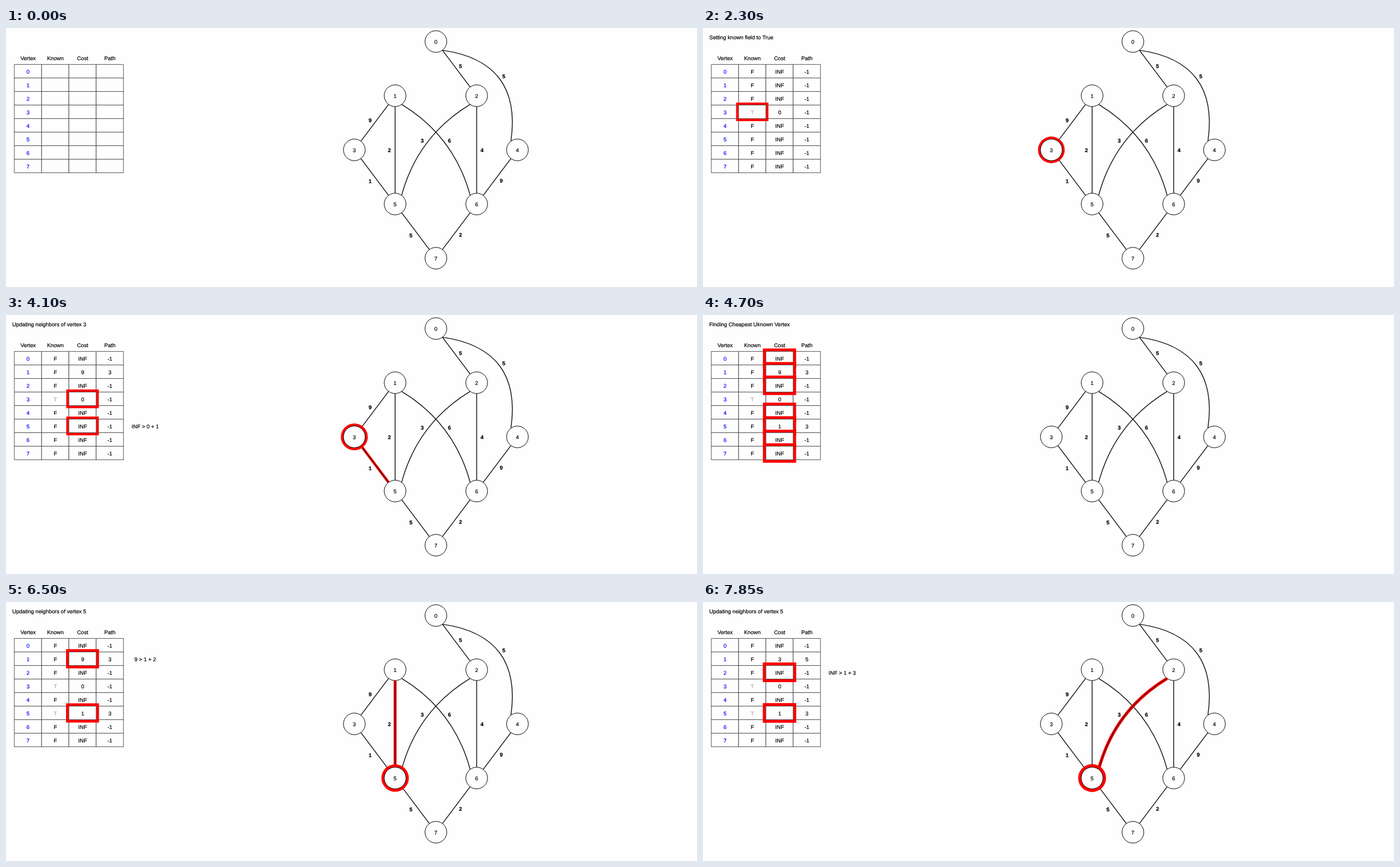
These frames come from a looping animation (1220 by 459 pixels, 8000 ms). An HTML page:

```html
<!DOCTYPE html>
<html lang="en">
<head>
<meta charset="utf-8">
<title>Shortest path table</title>
<style>
  html, body { margin: 0; width: 100%; height: 100%; overflow: hidden; background: #fefefe; }
  svg { display: block; font: 9.6px "Liberation Sans", Arial, sans-serif; text-rendering: geometricPrecision; }
</style>
</head>
<body>
<svg id="stage" width="1220" height="459" viewBox="0 0 1220 459"></svg>
<script>
const LOOP = 8000, START = 500, TICK = 150, STEP = 750;
const SCALE = 0.96, RADIUS = 20 * SCALE, CELL_W = 48.15, CELL_H = 24;
const RED = '#f00';

const nodes = [[759, 24], [687, 120], [831, 120], [615, 216], [903, 216], [687, 312], [831, 312], [759, 408]];

// from, to, weight, label x, label y, curvature
const edges = [
  [0, 2, 5, 802.5, 67, 0], [0, 4, 5, 879, 85, 0.5],
  [1, 3, 9, 643, 163, 0], [1, 5, 2, 677, 216.5, 0], [1, 6, 6, 783, 199, 0.2],
  [2, 5, 3, 735, 199, -0.2], [2, 6, 4, 840.5, 216.5, 0],
  [3, 5, 1, 643, 271, 0], [4, 6, 9, 874.5, 270.5, 0],
  [5, 7, 5, 715, 367.5, 0], [6, 7, 2, 802.5, 366.5, 0]
];

const KNOWN = 1, COST = 2;
const colX = col => 38.8 + col * CELL_W;
const rowY = row => 76.6 + row * CELL_H;

function text(x, y, str, color = '#000', extra = 'text-anchor="middle"') {
  const safe = String(str).replace('>', '&gt;');
  return `<text x="${x}" y="${y + 3.5}" fill="${color}" stroke="${color}" stroke-width="0.2" ${extra}>${safe}</text>`;
}

function edgePath([a, b, , , , bend]) {
  const [ax, ay] = nodes[a], [bx, by] = nodes[b];
  const len = Math.hypot(bx - ax, by - ay);
  const ux = (bx - ax) / len * RADIUS, uy = (by - ay) / len * RADIUS;
  const x1 = ax + ux, y1 = ay + uy, x2 = bx - ux, y2 = by - uy;
  const cx = (x1 + x2) / 2 + (y2 - y1) * bend;
  const cy = (y1 + y2) / 2 - (x2 - x1) * bend;
  return `M${x1} ${y1}Q${cx} ${cy} ${x2} ${y2}`;
}

function drawEdge(edge, glow) {
  const path = (color, width) =>
    `<path d="${edgePath(edge)}" fill="none" stroke="${color}" stroke-width="${width}"/>`;
  const line = glow ? path(RED, (glow + 0.5) * SCALE) + path('#600', 1.7) : path('#111', 1.45);
  return line + text(edge[3], edge[4], edge[2], '#000', 'text-anchor="middle" font-weight="bold"');
}

function drawNode(i, glow) {
  const [x, y] = nodes[i];
  const halo = glow ? `<circle cx="${x}" cy="${y}" r="${RADIUS + (glow + 0.5) * SCALE}" fill="${RED}"/>` : '';
  return halo + `<circle cx="${x}" cy="${y}" r="${RADIUS}" fill="#fefefe" stroke="#000"/>` + text(x, y + 0.3, i);
}

function drawCell(col, row, str, glow) {
  const x = colX(col), y = rowY(row);
  const box = (grow, paint) =>
    `<rect x="${x - CELL_W / 2 - grow}" y="${y - CELL_H / 2 - grow}" width="${CELL_W + 2 * grow}" height="${CELL_H + 2 * grow}" ${paint}/>`;
  const color = col === 0 ? '#00f' : str === 'T' ? '#aaa' : '#000';
  return (glow ? box((glow + 0.5) * SCALE, `fill="${RED}"`) : '') +
    box(0, 'fill="#fefefe" stroke="#444" stroke-width="0.9"') + text(x + 0.2, y + 0.4, str, color);
}

// Run the algorithm once and record what each step shows.
function buildSteps() {
  const known = Array(8).fill(false), cost = Array(8).fill(Infinity), prev = Array(8).fill(-1);
  const name = value => value === Infinity ? 'INF' : value;
  const steps = [];
  const record = (message, cells, node = -1, edge = null, compare = null) => steps.push({
    message, cells, node, edge, compare,
    table: known.map((k, i) => [i, k ? 'T' : 'F', name(cost[i]), prev[i]])
  });
  cost[3] = 0;
  while (steps.length < 10) {
    const open = known.map((k, i) => i).filter(i => !known[i]);
    record('Finding Cheapest Uknown Vertex', open.map(i => [COST, i]));
    const v = open.reduce((best, i) => cost[i] < cost[best] ? i : best);
    record('Cheapest Unknown Vertex: ' + v, [[COST, v]], v);
    known[v] = true;
    record('Setting known field to True', [[KNOWN, v]], v);
    for (let n = 0; n < 8; n++) {
      const edge = edges.find(([a, b]) => (a === v && b === n) || (a === n && b === v));
      if (!edge || known[n]) continue;
      const total = cost[v] + edge[2];
      const rule = `${name(cost[n])} > ${cost[v]} + ${edge[2]}`;
      record('Updating neighbors of vertex ' + v, [[COST, v], [COST, n]], v, edge,
        { row: n, str: cost[n] > total ? rule : `!(${rule})` });
      if (cost[n] > total) { cost[n] = total; prev[n] = v; }
    }
  }
  return steps;
}

const steps = buildSteps();
const blank = { message: '', cells: [], node: -1, edge: null, compare: null,
  table: nodes.map((_, i) => [i, '', '', '']) };

// Highlight thickness: a triangle wave between 3 and 5.5.
function pulse(time) {
  const PEAK = 1050, PERIOD = 1730;
  const phase = (time - PEAK) / PERIOD;
  const part = phase - Math.floor(phase);
  return 3 + 2.5 * Math.abs(1 - 2 * part);
}

function render(time) {
  const step = time < START ? blank : steps[Math.min(9, Math.floor((time - START) / STEP))];
  const glow = pulse(time);
  const lit = (col, row) => step.cells.some(([c, r]) => c === col && r === row);
  let out = text(11, 16, step.message, '#000', '');
  ['Vertex', 'Known', 'Cost', 'Path'].forEach((title, col) => out += text(colX(col) + 0.2, 53, title));
  let top = '';
  step.table.forEach((values, row) => values.forEach((value, col) => {
    if (lit(col, row)) top += drawCell(col, row, value, glow);
    else out += drawCell(col, row, value, 0);
  }));
  edges.forEach(edge => { if (edge !== step.edge) out += drawEdge(edge, 0); });
  nodes.forEach((_, i) => { if (i !== step.node) out += drawNode(i, 0); });
  if (step.edge) out += drawEdge(step.edge, glow);
  if (step.node >= 0) out += drawNode(step.node, glow);
  if (step.compare) out += text(245.8, rowY(step.compare.row) + 0.4, step.compare.str);
  return out + top;
}

const stage = document.getElementById('stage');
const origin = performance.now();
let shown = -1;

function frame() {
  const t = (performance.now() - origin) % LOOP;
  const tick = t < START ? 0 : START + Math.floor((t - START) / TICK) * TICK;
  if (tick !== shown) {
    shown = tick;
    stage.innerHTML = render(tick);
  }
  requestAnimationFrame(frame);
}
frame();
</script>
</body>
</html>
```
